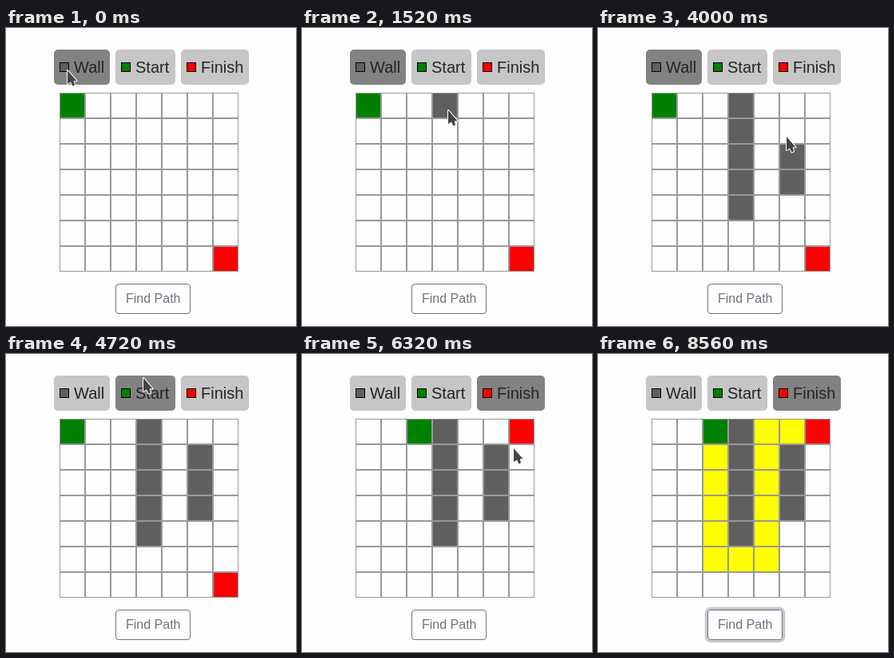
Recreate the animation shown at these times as an HTML page. Size 363 by 373 pixels, loop 8640 ms.

```html
<!DOCTYPE html>
<html lang="en">
<head>
<meta charset="utf-8">
<title>Path finder</title>
<style>
  html, body { margin: 0; width: 100%; height: 100%; overflow: hidden; background: #fefefe; }
  body { position: relative; font-family: "Liberation Sans", Arial, sans-serif; color: #212529; }
  body * { box-sizing: border-box; }
  .tool, #find, #grid, #cursor { position: absolute; }
  .tool { top: 27px; height: 44px; border-radius: 5px; padding: 7px 0 0 25px; font-size: 20px; line-height: 30px; background: #c6c6c6; white-space: nowrap; }
  .tool.on { background: #828282; }
  .tool i { position: absolute; left: 7px; top: 16px; width: 12px; height: 12px; border: 1px solid #000; }
  #grid { left: 67px; top: 81px; width: 224px; display: grid; grid-template-columns: repeat(7, 32px); }
  #grid div { height: 32px; border: 1px solid #999; }
  .wall { background: #5f5f5f; }
  .start { background: #008000; }
  .finish { background: #f00; }
  .path { background: #ff0; }
  #find { left: 137px; top: 320px; width: 94px; height: 38px; border: 1px solid #6c757d; border-radius: 4px; padding: 6px 12px; font-size: 16px; line-height: 24px; white-space: nowrap; }
  #cursor { left: 0; top: 0; overflow: visible; }
  #cursor path { fill: #444; stroke: #fff; stroke-width: 2; stroke-linejoin: round; paint-order: stroke; }
</style>
</head>
<body>
<div class="tool" style="left:60px;width:70px"><i class="wall"></i>Wall</div>
<div class="tool" style="left:137px;width:75px"><i class="start"></i>Start</div>
<div class="tool" style="left:219px;width:85px"><i class="finish"></i>Finish</div>
<div id="grid"></div>
<div id="find">Find Path</div>
<svg id="cursor" width="22" height="24">
  <path id="arrow" d="M1 1V18L5 15.5L7.5 20.5L10 19.5L8.7 14.2H12.5Z"/>
  <path id="hand" d="M0 2Q1.8 .6 3.2 2.2L5.8 8L11.4 8.2Q12.6 9 12.8 11V16.5L11.8 21H3.6L2 18.5L-3.6 13.6Q-4.4 12 -2.8 11.4L1.8 13Z"/>
</svg>
<script>
const LOOP = 8640, STEP = 80, SIZE = 7, FADE = 150;
const $ = id => document.getElementById(id);
const tools = [...document.querySelectorAll('.tool')];
const find = $('find'), cursor = $('cursor');
const cells = Array.from({ length: SIZE * SIZE }, () => $('grid').appendChild(document.createElement('div')));

// Pointer stops: arrival time, x, y, rest before setting off
const stops = [
  [0, 76, 52], [960, 165, 121, 80], [1360, 182, 102], [2480, 180, 197, 160],
  [2640, 178, 219], [3120, 235, 175], [3600, 236, 182, 320], [4000, 235, 135, 160],
  [4560, 171, 29], [4960, 150, 97, 160], [5360, 218, 61, 240], [5520, 252, 44],
  [6000, 272, 92, 160], [6960, 195, 332, 160], [7760, 78, 273, 640]
];

const ramp = (t, from, span = FADE) => Math.min(1, Math.max(0, (t - from) / span));
const index = (c, r) => r * SIZE + c;

function pointer(t) {
  const i = stops.findIndex(s => s[0] > t);
  const [end, x1, y1, rest = 0] = stops.at(i);
  const [begin, x0, y0] = i < 0 ? stops.at(-1) : stops[i - 1];
  const k = ramp(t, begin + rest, end - begin - rest || 1);
  const eased = k * k * (3 - 2 * k);
  return [x0 + (x1 - x0) * eased, y0 + (y1 - y0) * eased].map(Math.round);
}

// One wall is drawn downwards, the other upwards
function wallsAt(t) {
  const walls = new Set();
  for (let r = 0; r < 5; r++) if (t >= 1520 + 260 * r) walls.add(index(3, r));
  for (let r = 3; r > 0; r--) if (t >= 3760 + 200 * (3 - r)) walls.add(index(5, r));
  return walls;
}

// Up first, then down, right and left
function neighbours(i) {
  const c = i % SIZE;
  return [i - SIZE, i + SIZE, c < SIZE - 1 ? i + 1 : -1, c > 0 ? i - 1 : -1]
    .filter(n => n >= 0 && n < SIZE * SIZE);
}

function shortestPath(start, finish, walls) {
  const distance = new Map([[finish, 0]]);
  for (const i of distance.keys())
    for (const n of neighbours(i))
      if (!walls.has(n) && !distance.has(n)) distance.set(n, distance.get(i) + 1);
  const path = [];
  for (let i = start; i !== finish;) {
    path.push(i);
    i = neighbours(i).find(n => distance.get(n) === distance.get(i) - 1);
  }
  return path;
}
const solution = shortestPath(index(2, 0), index(6, 0), wallsAt(LOOP));

function paintGrid(t) {
  const kinds = [];
  if (t >= 7040) solution.forEach(i => { kinds[i] = 'path'; });
  wallsAt(t).forEach(i => { kinds[i] = 'wall'; });
  kinds[index(t < 5200 ? 0 : 2, 0)] = 'start';
  kinds[index(6, t < 6160 ? 6 : 0)] = 'finish';
  cells.forEach((cell, i) => { cell.className = kinds[i] || ''; });
}

function paintButtons(t) {
  const active = t < 4720 ? 0 : t < 5680 ? 1 : 2;
  tools.forEach((tool, i) => tool.classList.toggle('on', i === active));
  const hover = ramp(t, 6800) - ramp(t, 7600);
  const focus = t < 7040 ? 0 : 0.5 * (1 - ramp(t, 8530));
  const text = [108, 117, 125].map(v => v + (255 - v) * hover);
  find.style.background = `rgba(108,117,125,${hover})`;
  find.style.color = `rgb(${text})`;
  find.style.boxShadow = `0 0 0 ${focus ? 3.2 : 0}px rgba(108,117,125,${focus})`;
}

function paintCursor(t) {
  const [x, y] = pointer(t);
  const onButton = y >= 320;
  cursor.style.transform = `translate(${x}px,${y}px)`;
  cursor.style.display = t < 7840 ? '' : 'none';
  $('arrow').style.display = onButton ? 'none' : '';
  $('hand').style.display = onButton ? '' : 'none';
}

const began = performance.now();
function draw() {
  const t = Math.floor((performance.now() - began) % LOOP / STEP) * STEP;
  paintGrid(t);
  paintButtons(t);
  paintCursor(t);
  requestAnimationFrame(draw);
}
draw();
</script>
</body>
</html>
```
